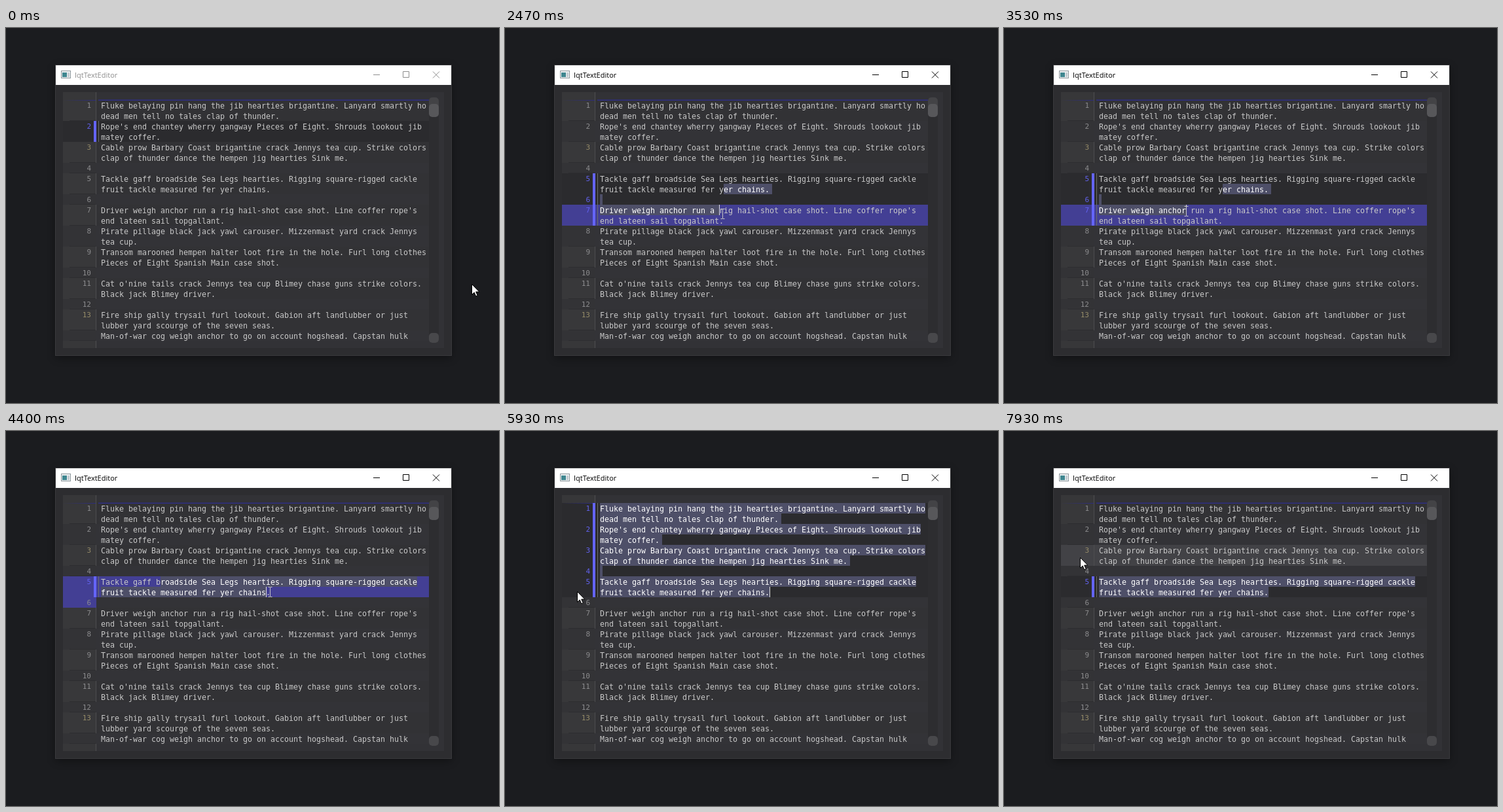
An HTML page for the animation above (8000 ms loop, 753x573 px).

```html
<!DOCTYPE html>
<html lang="en">
<head>
<meta charset="utf-8">
<title>Text editor selection</title>
<style>
  html, body { margin: 0; width: 100%; height: 100%; overflow: hidden; background: #1b1c1f; }
  svg { display: block; }
  text { white-space: pre; }
  .line { font: 11.63px "DejaVu Sans Mono", monospace; fill: #c8c8c8; }
  .line .on { fill: #fff; }
  .num { font: 11px "DejaVu Sans Mono", monospace; text-anchor: end; }
  .title { font: 11px "Open Sans", sans-serif; }
</style>
</head>
<body>
<svg width="753" height="573" viewBox="0 0 753 573">
  <defs>
    <filter id="blur" x="-10%" y="-10%" width="120%" height="120%"><feGaussianBlur stdDeviation="7"/></filter>
    <linearGradient id="fade"><stop stop-color="#2c2c80" stop-opacity="0"/><stop offset="1" stop-color="#2c2c80"/></linearGradient>
  </defs>
  <rect width="753" height="573" fill="#1b1c1f"/>
  <rect x="76" y="60" width="604" height="444" opacity=".4" filter="url(#blur)"/>
  <rect x="75" y="56" width="606" height="445" fill="#3a3a3d"/>
  <rect x="76" y="57" width="604" height="30" fill="#fff"/>
  <rect x="76" y="87" width="604" height="413" fill="#2d2d30"/>
  <rect x="84.500" y="65.500" width="14" height="11" fill="#eef2f3" stroke="#8d979c"/>
  <rect x="86" y="68" width="7" height="7" fill="#3f8790"/>
  <rect x="94" y="68" width="3" height="7" fill="#c3cbd0"/>
  <g id="chrome">
    <text class="title" x="105" y="76">IqtTextEditor</text>
    <path d="M561 71.500h10M606.500 66.500h9v9h-9zM652 66.500l10 10M662 66.500l-10 10" fill="none" stroke="currentColor"/>
  </g>
  <rect x="87" y="98" width="582" height="391" fill="#323236"/>
  <rect x="87" y="98" width="50" height="391" fill="#373739"/>
  <rect x="137" y="98" width="1" height="391" fill="#4d4d4f"/>
  <g id="view"></g>
  <rect x="646" y="106" width="15" height="375" rx="5" fill="#2d2d30"/>
  <rect x="646" y="106" width="15" height="20" rx="5" fill="#434346"/>
  <rect x="646" y="116" width="15" height="20" rx="5" fill="#57575a"/>
  <rect x="646" y="466" width="15" height="15" rx="5" fill="#48484b"/>
  <path id="arrow" d="M.500 .500v16l3.700-3.500 2.500 5.800 2.500-1.100-2.500-5.600h5.100z" fill="#fff" stroke="#000"/>
  <path id="beam" d="M-3 -7.500h2.500l.500.500.500-.500H3M-3 7.500h2.500L0 7l.500.500H3M0 -7V7" fill="none" stroke="#c4c4c4"/>
</svg>
<script>
const LOOP = 8000, TOP = 110, LEFT = 145, LINE_H = 16, CHAR_W = 7;

// Each row is one numbered paragraph; "|" marks a soft wrap.
const rows = [
  "Fluke belaying pin hang the jib hearties brigantine. Lanyard smartly ho|dead men tell no tales clap of thunder.",
  "Rope's end chantey wherry gangway Pieces of Eight. Shrouds lookout jib|matey coffer.",
  "Cable prow Barbary Coast brigantine crack Jennys tea cup. Strike colors|clap of thunder dance the hempen jig hearties Sink me.",
  "",
  "Tackle gaff broadside Sea Legs hearties. Rigging square-rigged cackle|fruit tackle measured fer yer chains.",
  "",
  "Driver weigh anchor run a rig hail-shot case shot. Line coffer rope's|end lateen sail topgallant.",
  "Pirate pillage black jack yawl carouser. Mizzenmast yard crack Jennys|tea cup.",
  "Transom marooned hempen halter loot fire in the hole. Furl long clothes|Pieces of Eight Spanish Main case shot.",
  "",
  "Cat o'nine tails crack Jennys tea cup Blimey chase guns strike colors.|Black jack Blimey driver.",
  "",
  "Fire ship gally trysail furl lookout. Gabion aft landlubber or just|lubber yard scourge of the seven seas.",
  "Man-of-war cog weigh anchor to go on account hogshead. Capstan hulk"
];
const lines = [];
const spans = rows.map((row, r) => {
  const parts = row.split("|"), first = lines.length;
  parts.forEach((text, i) => lines.push({ text, row: r, last: i === parts.length - 1 }));
  return { first, end: lines.length - 1, y: TOP + first * LINE_H, h: parts.length * LINE_H };
});

// Pointer path: time, x, y
const path = [
  [0, 711, 391], [600, 711, 391], [850, 600, 405], [1100, 430, 300], [1400, 330, 172],
  [2000, 336, 247], [2395, 336, 247], [2400, 332, 284], [2470, 332, 284], [2850, 340, 445],
  [3050, 325, 424], [3100, 324, 416], [3130, 324, 409], [3270, 310, 330], [3330, 300, 315],
  [3700, 260, 250], [4000, 239, 231], [4200, 330, 240], [4330, 400, 258], [4368, 403, 250],
  [4400, 403, 246], [4700, 300, 215], [5000, 200, 154], [5070, 180, 150], [5330, 112, 120],
  [5730, 112, 120], [5930, 110, 244], [6250, 108, 445], [6530, 104, 322], [6570, 103, 304],
  [6600, 102, 289], [6850, 110, 200], [7050, 112, 238], [7200, 112, 238], [7400, 114, 351],
  [7470, 114, 350], [7800, 116, 195], [7930, 116, 193], [8000, 116, 193]
];
// Mouse drags: by character in the text, by whole row in the gutter
const drags = [
  { from: 2000, to: 3600, text: true },
  { from: 4000, to: 5050, text: true },
  { from: 5320, to: 7000 },
  { from: 7060, to: 7180 }
];

const clamp = (v, lo, hi) => Math.min(hi, Math.max(lo, v));

function pointer(t) {
  const i = Math.max(1, path.findIndex(p => p[0] >= t));
  const [t0, x0, y0] = path[i - 1], [t1, x1, y1] = path[i];
  const k = clamp((t - t0) / (t1 - t0), 0, 1);
  return { x: Math.round(x0 + (x1 - x0) * k), y: Math.round(y0 + (y1 - y0) * k) };
}

function place({ x, y }) {
  const line = clamp(Math.floor((y - TOP) / LINE_H), 0, lines.length - 1);
  return { line, col: clamp(Math.floor((x - LEFT) / CHAR_W), 0, lines[line].text.length) };
}

const rowStart = r => ({ line: spans[r].first, col: 0 });
const rowEnd = r => ({ line: spans[r].end, col: lines[spans[r].end].text.length });
const before = (a, b) => a.line - b.line || a.col - b.col;

function selection(t) {
  const drag = drags.filter(d => d.from <= t).pop();
  if (!drag) return { start: rowStart(1), end: rowStart(1) };
  let anchor = place(pointer(drag.from)), head = place(pointer(Math.min(t, drag.to)));
  if (!drag.text) {
    const a = lines[anchor.line].row, b = lines[head.line].row;
    anchor = b < a ? rowEnd(a) : rowStart(a);
    head = b < a ? rowStart(b) : rowEnd(b);
  }
  const [start, end] = [anchor, head].sort(before);
  return { start, end, head, blue: drag.text && t < drag.to };
}

function hoverRow(t) {
  const p = pointer(t);
  if (p.x < 87 || p.x > 646 || p.y < TOP || p.y >= TOP + lines.length * LINE_H) return -1;
  return lines[place(p).line].row;
}

const rect = (x, y, w, h, fill) => `<rect x="${x}" y="${y}" width="${w}" height="${h}" fill="${fill}"/>`;

function drawRow(r, sel, hover, gutterHover) {
  const { y, h } = spans[r];
  const picked = r >= lines[sel.start.line].row && r <= lines[sel.end.line].row;
  const lit = sel.blue ? "#433f94" : picked ? null : "#424246";
  const gutter = lit && gutterHover.includes(r) ? lit : picked ? "#2b2b2e" : r % 2 ? "#333336" : "#38383a";
  const body = lit && hover === r ? lit : picked ? "#2b2b2e" : r % 2 ? "#333337" : "#323235";
  let out = rect(87, y, r % 2 || picked ? 51 : 50, h, gutter) + rect(138, y, 508, h, body);
  if (!picked && gutter !== lit) out += rect(97, y + h - 1, 40, 1, "#2d2d30");
  if (r === 0) {
    out += rect(87, 110, 50, 1, "url(#fade)");
    if (!picked) out += rect(141, 109.5, 505, 1.5, "#2f2f84");
  }
  if (picked) out += rect(134, y, 4, h, "#6464fa") + rect(141, y, 1, h, "#6a6c68");
  if (r < 13) {
    const ink = picked ? "#6262ee" : r === 2 || r === 12 ? "#958b68" : "#8c8c8e";
    out += `<text class="num" x="130" y="${y + 12}" fill="${ink}">${r + 1}</text>`;
  }
  return out;
}

function drawLine({ text, last }, i, { start, end }) {
  const y = TOP + i * LINE_H;
  const inside = i >= start.line && i <= end.line;
  const a = inside && i === start.line ? start.col : 0;
  const b = !inside ? 0 : i === end.line ? end.col : text.length;
  const extra = inside && last && i < end.line ? 4 : 0;
  const width = (b - a) * CHAR_W + extra;
  const box = width > 0 ? rect(LEFT + a * CHAR_W, y, width, LINE_H, "#4e4f68") : "";
  const cut = b > a ? `${text.slice(0, a)}<tspan class="on">${text.slice(a, b)}</tspan>${text.slice(b)}` : text;
  return `${box}<text class="line" x="${LEFT}" y="${y + 13}">${cut}</text>`;
}

const [chrome, view, arrow, beam] = ["chrome", "view", "arrow", "beam"].map(id => document.getElementById(id));
let shown = "";

function render(t) {
  const sel = selection(t), hover = hoverRow(t - 30);
  const gutterHover = [hover, hoverRow(t - 60)];
  let out = rows.map((_, r) => drawRow(r, sel, hover, gutterHover)).join("")
    + lines.map((line, i) => drawLine(line, i, sel)).join("");
  if (sel.head && t < 7700)
    out += rect(LEFT + sel.head.col * CHAR_W, TOP + sel.head.line * LINE_H, 1, LINE_H, "#dcdcdc");
  if (out !== shown) view.innerHTML = shown = out;

  const ink = t < drags[0].from ? "#8e8e8e" : "#000";
  chrome.style.color = chrome.style.fill = ink;

  const { x, y } = pointer(t);
  const overText = x > 141 && x < 646 && y > 98 && y < 489;
  arrow.style.display = overText ? "none" : "";
  beam.style.display = overText ? "" : "none";
  arrow.setAttribute("transform", `translate(${x} ${y})`);
  beam.setAttribute("transform", `translate(${x + 0.5} ${y})`);
}

const began = performance.now();
function tick() {
  render((performance.now() - began) % LOOP);
  requestAnimationFrame(tick);
}
tick();
</script>
</body>
</html>
```
